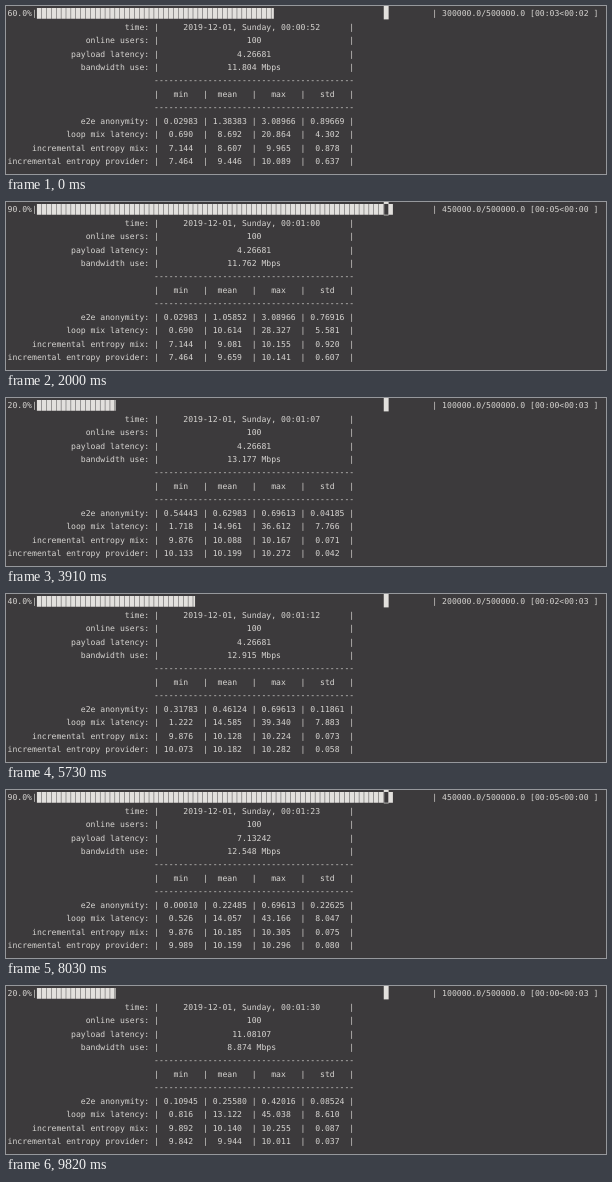
Animation of 600 by 168 pixels, one loop 10000 ms. Source, as an HTML page:

```html
<!DOCTYPE html>
<html lang="en">
<head>
<meta charset="utf-8">
<title>Mix network statistics</title>
<style>
  html, body { margin: 0; width: 100%; height: 100%; overflow: hidden; background: #3c3a3c; }
  svg { display: block; }
  text {
    font: 8.114px "DejaVu Sans Mono", monospace;
    fill: #d6d4d1;
    white-space: pre;
    text-rendering: geometricPrecision;
  }
</style>
</head>
<body>
<svg id="term" width="600" height="168" viewBox="0 0 600 168">
  <rect width="600" height="168" fill="#3c3a3c"/>
  <path id="bar" fill="#e2e0dd"/>
  <rect id="cursor" y="0" height="13.4" fill="#e2e0dd"/>
  <rect id="under" y="1.95" height="10.75" fill="#3c3a3c"/>
</svg>
<script>
const LOOP = 10000;
const X0 = 1.6, CW = 4.885, LH = 13.44, BASE = 10.25;
const COLS = 121, CURSOR_COL = 77, TOTAL = 500000;
const BLOCK_TOP = 1.95, BLOCK_H = 10.75, GAP = 0.45;
const TABLE_LAG = 60;

// Moments at which progress moves on by 10 %, wrapping after 100 %.
const ticks = [0, 420, 1330, 1910, 2760, 3060, 3360, 3850, 4580, 5150,
  6150, 6330, 6970, 7450, 8030, 8580, 8970, 9180, 9820];
const FIRST = 6;

// Each run eases from one key state to another between two progress tenths.
const runs = [
  { from: 6, to: 9, power: 1, latency: [4.26681, 4.26681], mbps: [11.804, 11.762] },
  { from: 2, to: 9, power: 1.6, latency: [4.26681, 7.13242], mbps: [13.177, 12.548] },
  { from: 2, to: 9, power: 1.6, latency: [11.08107, 11.08107], mbps: [8.874, 8.874] }
];

// Key states hold min, mean, max and std; the last run shows only its start.
const stats = [
  { label: "e2e anonymity:", digits: 5, keys: [
    [[0.02983, 1.38383, 3.08966, 0.89669], [0.02983, 1.05852, 3.08966, 0.76916]],
    [[0.54443, 0.62983, 0.69613, 0.04185], [0.0001, 0.22485, 0.69613, 0.22625]],
    [[0.10945, 0.2558, 0.42016, 0.08524]]] },
  { label: "loop mix latency:", digits: 3, keys: [
    [[0.69, 8.692, 20.864, 4.302], [0.69, 10.614, 28.327, 5.581]],
    [[1.718, 14.961, 36.612, 7.766], [0.526, 14.057, 43.166, 8.047]],
    [[0.816, 13.122, 45.038, 8.61]]] },
  { label: "incremental entropy mix:", digits: 3, keys: [
    [[7.144, 8.607, 9.965, 0.878], [7.144, 9.081, 10.155, 0.92]],
    [[9.876, 10.088, 10.167, 0.071], [9.876, 10.185, 10.305, 0.075]],
    [[9.892, 10.14, 10.255, 0.087]]] },
  { label: "incremental entropy provider:", digits: 3, keys: [
    [[7.464, 9.446, 10.089, 0.637], [7.464, 9.659, 10.141, 0.607]],
    [[10.133, 10.199, 10.272, 0.042], [9.989, 10.159, 10.296, 0.08]],
    [[9.842, 9.944, 10.011, 0.037]]] }
];

const $ = id => document.getElementById(id);
const svg = $("term"), bar = $("bar"), cursor = $("cursor"), under = $("under");
const colX = c => X0 + c * CW;
const two = n => String(n).padStart(2, "0");
const clock = s => two(Math.floor(s / 60)) + ":" + two(Math.floor(s) % 60);
const mix = (a, b, k) => a + (b - a) * k;
const tenths = i => (i + FIRST) % 11;

const rows = Array.from({ length: 12 }, (_, r) => {
  const t = document.createElementNS("http://www.w3.org/2000/svg", "text");
  t.setAttribute("x", X0);
  t.setAttribute("y", BASE + r * LH);
  svg.appendChild(t);
  return t;
});

function set(el, attrs) {
  for (const k in attrs) el.setAttribute(k, attrs[k]);
}

function put(row, str) {
  if (rows[row].textContent !== str) rows[row].textContent = str;
}

function center(str, width) {
  const left = Math.floor((width - str.length) / 2);
  return " ".repeat(left) + str + " ".repeat(width - str.length - left);
}

function line(label, cells, width) {
  return label.padStart(29) + " |" + cells.map(c => center(c, width) + "|").join("");
}

function drawProgress(i) {
  const done = tenths(i);
  const elapsed = Math.max(0, 0.61 * done - 0.41);
  const eta = done ? clock(elapsed / done * (10 - done)) : "?";
  const left = (done * 10).toFixed(1) + "%|";
  const right = `| ${(done * TOTAL / 10).toFixed(1)}/${TOTAL.toFixed(1)} [${clock(elapsed)}<${eta} ]`;
  const width = COLS - left.length - right.length;
  put(0, left + " ".repeat(width) + right);

  const eighths = Math.floor(width * done * 8 / 10);
  const full = Math.floor(eighths / 8), part = eighths % 8 / 8;
  const cell = (c, w) =>
    `M${colX(left.length + c).toFixed(2)} ${BLOCK_TOP}h${w.toFixed(2)}v${BLOCK_H}h${(-w).toFixed(2)}z`;
  let d = "";
  for (let c = 0; c < full; c++) d += cell(c, CW - GAP);
  if (part) d += cell(full, CW * part);
  set(bar, { d });

  // A fresh bar leaves the cursor at the end of its line.
  const col = done ? CURSOR_COL : COLS;
  const covered = left.length + full > col;
  set(cursor, { x: colX(col), width: CW });
  set(under, { x: colX(col) + GAP, width: covered ? CW - 2 * GAP : 0 });
}

function drawTable(i) {
  // An empty bar keeps the table of the finished run.
  const shown = tenths(i) ? i : i - 1;
  const n = Math.floor((shown + FIRST) / 11);
  const { from, to, power, latency, mbps } = runs[n];
  const u = Math.min(1, Math.max(0, (tenths(shown) - from) / (to - from)));
  const k = 1 - (1 - u) ** power;
  const secs = Math.round(52.3 + 3.87 * ticks[shown] / 1000);
  const rule = " ".repeat(30) + "-".repeat(41);

  put(1, line("time:", ["2019-12-01, Sunday, 00:" + clock(secs)], 39));
  put(2, line("online users:", ["100"], 39));
  put(3, line("payload latency:", [latency[Math.round(u)].toFixed(5)], 39));
  put(4, line("bandwidth use:", [mix(...mbps, k).toFixed(3) + " Mbps"], 39));
  put(5, rule);
  put(6, line("", ["min", "mean", "max", "std"], 9));
  put(7, rule);
  stats.forEach(({ label, digits, keys }, r) => {
    const [a, b = a] = keys[n];
    const cells = a.map((v, j) => mix(v, b[j], k).toFixed(digits).padStart(6));
    put(8 + r, line(label, cells, 9));
  });
}

function render(t) {
  const i = ticks.filter(at => at <= t).length - 1;
  const late = i % 2 === 1 && t - ticks[i] < TABLE_LAG;
  drawProgress(i);
  drawTable(late ? i - 1 : i);
}

const start = performance.now();
function tick() {
  render((performance.now() - start) % LOOP);
  requestAnimationFrame(tick);
}
tick();
</script>
</body>
</html>
```
